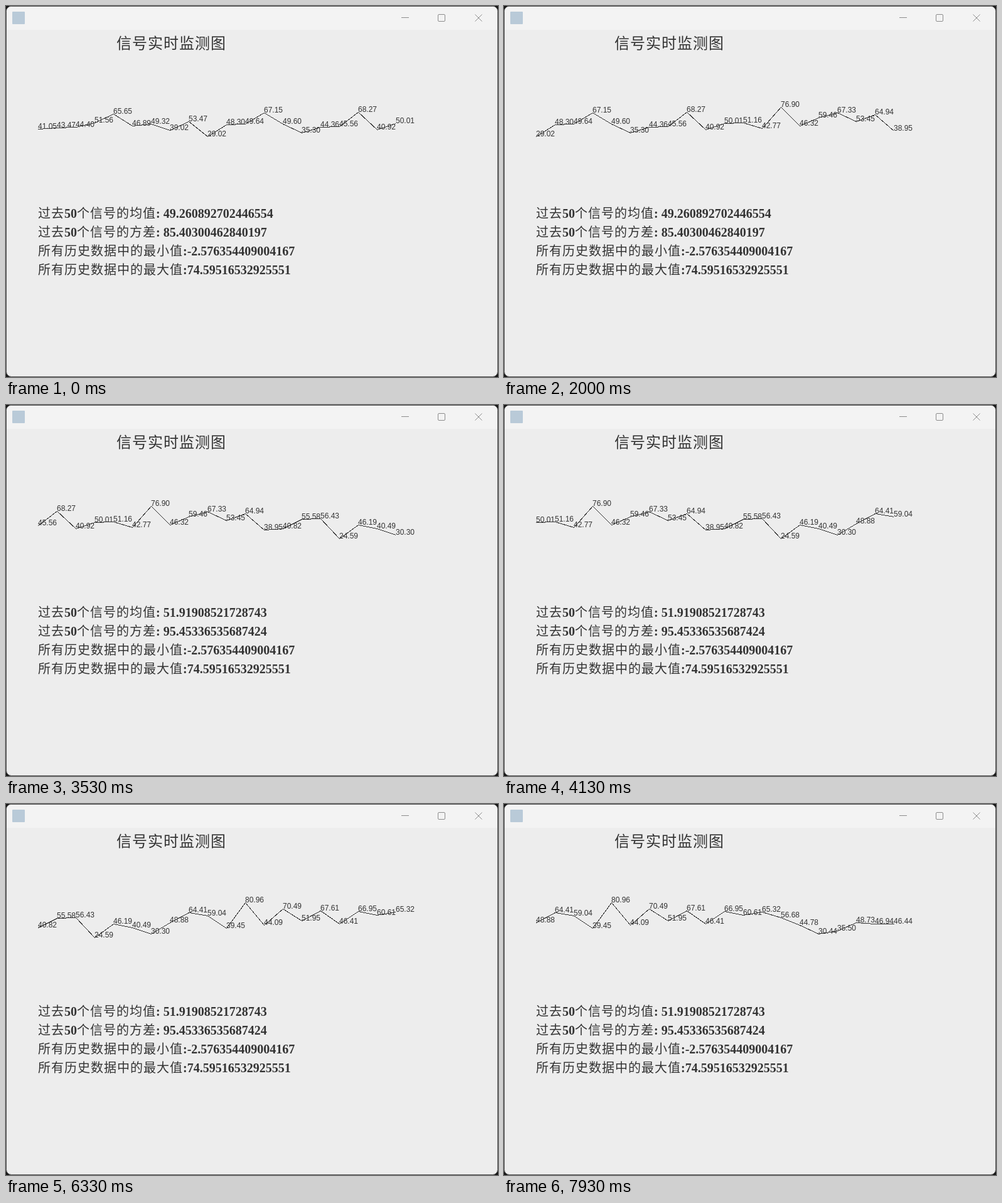
These frames come from a looping animation (784 px wide and 592 px high, 8 s). An HTML page:

```html
<!DOCTYPE html>
<html lang="zh-CN">
<head>
<meta charset="utf-8">
<title>信号实时监测图</title>
<style>
  html, body { margin: 0; width: 100%; height: 100%; overflow: hidden; background: #161616; }
  svg { display: block; }
  text { fill: #333; white-space: pre; }
  .title, .cjk { font-family: "Noto Sans CJK SC", "Noto Sans CJK", sans-serif; font-weight: 500; letter-spacing: 1px; }
  .title { font-size: 24px; }
  .stat { font: bold 20px "Liberation Serif", serif; }
  .label { font: 12px "Liberation Sans", Arial, sans-serif; }
  .chart { fill: none; stroke: #333; shape-rendering: crispEdges; }
  .buttons { fill: none; stroke: #8c8c8c; }
</style>
</head>
<body>
<svg width="784" height="592" viewBox="0 0 784 592">
  <rect x=".5" y=".5" width="783" height="591" rx="8" fill="#ededed" stroke="#505050"/>
  <path d="M1 38V8.500Q1 1 8.500 1H775.500Q783 1 783 8.500V38Z" fill="#f3f3f3"/>
  <rect x="10" y="9" width="20" height="20" rx="1" fill="#b9cad8"/>
  <g class="buttons">
    <path d="M630 18.500H642M747.500 13.500L758.500 24.500M758.500 13.500L747.500 24.500"/>
    <rect x="688.500" y="13.500" width="11" height="11" rx="1.500"/>
  </g>
  <text class="title" x="176" y="68">信号实时监测图</text>
  <g id="stats"></g>
  <polyline id="line" class="chart"/>
  <g id="labels"></g>
</svg>
<script>
const LOOP = 8000, VISIBLE = 20, STEP = 30;
const PERIOD = 218.75, PHASE = 78;   // sampling interval and its offset at the start
const STATS_CHANGE = 2200;

const signal = [
  41.05, 43.47, 44.40, 51.56, 65.65, 46.89, 49.32, 39.02, 53.47, 29.02,
  48.30, 49.64, 67.15, 49.60, 35.30, 44.36, 45.56, 68.27, 40.92, 50.01,
  51.16, 42.77, 76.90, 46.32, 59.46, 67.33, 53.45, 64.94, 38.95, 40.82,
  55.58, 56.43, 24.59, 46.19, 40.49, 30.30, 48.88, 64.41, 59.04, 39.45,
  80.96, 44.09, 70.49, 51.95, 67.61, 46.41, 66.95, 60.61, 65.32, 56.68,
  44.78, 30.44, 35.50, 48.73, 46.94, 46.44
];
const stats = [
  ["过去50个信号的均值: ", "49.260892702446554", "51.91908521728743"],
  ["过去50个信号的方差: ", "85.40300462840197", "95.45336535687424"],
  ["所有历史数据中的最小值:", "-2.576354409004167"],
  ["所有历史数据中的最大值:", "74.59516532925551"]
];

const byId = id => document.getElementById(id);

function add(parent, tag, attrs, content = "") {
  const el = document.createElementNS("http://www.w3.org/2000/svg", tag);
  for (const name in attrs) el.setAttribute(name, attrs[name]);
  el.textContent = content;
  return parent.appendChild(el);
}

const statValues = stats.map(([caption, first], i) => {
  const row = add(byId("stats"), "text", { class: "stat", x: 51, y: 338 + 30 * i });
  for (const part of caption.match(/[\u4e00-\u9fff]+|[^\u4e00-\u9fff]+/g))
    add(row, "tspan", /[\u4e00-\u9fff]/.test(part) ? { class: "cjk" } : {}, part);
  return add(row, "tspan", {}, first);
});

const xAt = i => 51 + STEP * i;
const yAt = value => Math.floor(238 - value);
const labels = Array.from({ length: VISIBLE }, (_, i) =>
  add(byId("labels"), "text", { class: "label", x: xAt(i) }));

function drawChart(shift) {
  const values = signal.slice(shift, shift + VISIBLE);
  byId("line").setAttribute("points",
    values.map((v, i) => `${xAt(i) + .5},${yAt(v) + .5}`).join(" "));
  values.forEach((v, i) => {
    labels[i].setAttribute("y", yAt(v));
    labels[i].textContent = v.toFixed(2);
  });
}

// The screen refreshes in alternating intervals of 130 and 70 ms.
const refreshTime = t => t - t % 200 + (t % 200 >= 130 ? 130 : 0);

let shownShift = -1, shownBatch = -1;
function render(t) {
  const time = refreshTime(t);
  const shift = Math.min(Math.floor((time + PHASE) / PERIOD), signal.length - VISIBLE);
  const batch = time >= STATS_CHANGE ? 1 : 0;
  if (shift !== shownShift) drawChart(shownShift = shift);
  if (batch !== shownBatch) {
    shownBatch = batch;
    stats.forEach(([, ...values], i) => {
      statValues[i].textContent = values[batch] ?? values[0];
    });
  }
}

const start = performance.now();
function tick() {
  render((performance.now() - start) % LOOP);
  requestAnimationFrame(tick);
}
tick();
</script>
</body>
</html>
```
